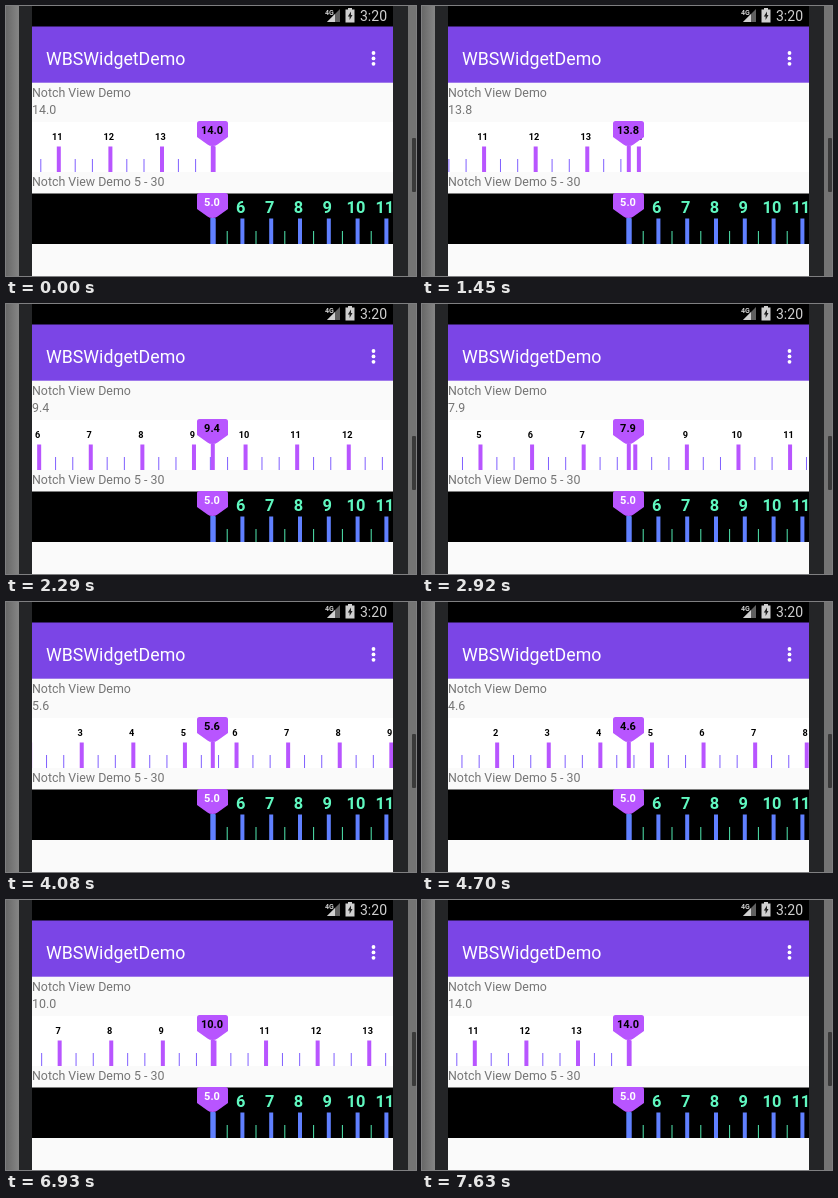
Recreate the animation shown at these times as an HTML page. Size 410 by 270 pixels, loop 8 s.

```html
<!DOCTYPE html>
<html lang="en">
<head>
<meta charset="utf-8">
<title>Notch View Demo</title>
<style>
  html, body { margin: 0; width: 100%; height: 100%; overflow: hidden; background: #707070; }
  svg { display: block; }
  text { font-family: Roboto, sans-serif; }
  .caption { font-size: 12.4px; fill: #757575; }
  .title { font-size: 17.75px; fill: #fff; }
  .clock { font-size: 14px; fill: #d0d0d0; }
  .label, .badge { font-weight: 700; text-anchor: middle; }
  .badge { font-size: 11px; }
</style>
</head>
<body>
<svg width="410" height="270" viewBox="0 0 410 270">
  <defs>
    <path id="pin" d="M-13 0H13Q15.5 0 15.5 2.5V16L5 23.5Q3 25 0 25Q-3 25 -5 23.5L-15.5 16V2.5Q-15.5 0 -13 0Z" fill="#b855ff"/>
    <linearGradient id="rim">
      <stop stop-color="#686868"/>
      <stop offset="1" stop-color="#868686"/>
    </linearGradient>
  </defs>

  <!-- Device -->
  <rect width="13" height="270" fill="url(#rim)"/>
  <rect x="402" width="8" height="270" fill="#747474"/>
  <rect x="13" width="389" height="270" fill="#242527"/>
  <rect x="406" y="132" width="4" height="54" rx="1" fill="#3a3a3a"/>
  <rect x="26" width="361" height="270" fill="#fafafa"/>

  <!-- Status bar -->
  <rect x="26" width="361" height="21" fill="#000"/>
  <text x="319" y="8.5" font-size="7" font-weight="700" fill="#d0d0d0">4G</text>
  <path d="M334 3V16H321Z" fill="#606060"/>
  <path d="M329 8V16H321Z" fill="#d0d0d0"/>
  <path d="M342 3.5V2H346V3.5H348.5V16.5H339.5V3.5Z" fill="#d0d0d0"/>
  <path d="M345 5.5L341.8 10.5H343.6V14L346.5 9H345Z" fill="#222"/>
  <text class="clock" x="354" y="15">3:20</text>

  <!-- Toolbar -->
  <rect x="26" y="20.5" width="361" height="56.2" fill="#7b45e6"/>
  <text class="title" x="40" y="59">WBSWidgetDemo</text>
  <g fill="#fff">
    <circle cx="367.5" cy="47" r="1.9"/>
    <circle cx="367.5" cy="52.4" r="1.9"/>
    <circle cx="367.5" cy="57.8" r="1.9"/>
  </g>

  <text class="caption" x="26" y="90.5">Notch View Demo</text>
  <text class="caption" x="26" y="107.5" data-value>14.0</text>
  <text class="caption" x="26" y="179.5">Notch View Demo 5 - 30</text>

  <!-- Rulers: x = 0 is the pointer -->
  <svg x="26" y="116" width="361" height="50" viewBox="-180.8 0 361 50">
    <rect x="-181" width="362" height="50" fill="#fff"/>
    <g id="light"></g>
    <rect x="-2" y="24" width="4" height="26" fill="#b855ff"/>
  </svg>
  <use href="#pin" x="206.5" y="115"/>
  <text class="badge" x="206" y="128" data-value>14.0</text>

  <rect x="26" y="187.5" width="361" height="50.5" fill="#000"/>
  <svg x="26" y="188" width="361" height="50" viewBox="-180.8 0 361 50">
    <g id="dark"></g>
    <rect x="-2.5" y="24" width="5" height="26" fill="#6080ff"/>
  </svg>
  <use href="#pin" x="206.5" y="187"/>
  <text class="badge" x="206" y="199.5" fill="#fff">5.0</text>
</svg>

<script>
const LOOP = 8000;
const STEP = 76.4; // the display refreshes this often while dragging, in ms
const UNIT = 51.6;
const START_VALUE = 14;

// skew below 1 makes a drag quick at first and slow at the end.
const drags = [
  { start: 1373, steps: 20, to: 7.89, skew: 0.76 },
  { start: 3622, steps: 11, to: 3.78, skew: 1 },
  { start: 4462, steps: 13, to: 9.6, skew: 1 },
  { start: 6773, steps: 11, to: 14, skew: 1 }
];

const smooth = u => u * u * (3 - 2 * u);

function valueAt(time) {
  let value = START_VALUE;
  for (const { start, steps, to, skew } of drags) {
    if (time < start) break;
    const progress = Math.min(Math.floor((time - start) / STEP) / steps, 1);
    value += (to - value) * smooth(progress ** skew);
  }
  return value;
}

function add(parent, name, attributes, content = "") {
  const node = document.createElementNS("http://www.w3.org/2000/svg", name);
  for (const key in attributes) node.setAttribute(key, attributes[key]);
  node.textContent = content;
  parent.append(node);
}

function buildRuler(group, { from, to, unit, parts, major, minor, ink, size, baseline }) {
  for (let i = 0; i <= (to - from) * parts; i++) {
    const x = i * unit / parts;
    if (i % parts) {
      add(group, "rect", { x: x - 0.5, y: 37, width: 1, height: 13, fill: minor });
      continue;
    }
    add(group, "rect", { x: x - 1.2, y: 24.5, width: 4, height: 25.5, fill: major });
    add(group, "text", { class: "label", x: x - 0.8, y: baseline, "font-size": size, fill: ink },
      from + i / parts);
  }
}

const light = document.getElementById("light");
buildRuler(light, {
  from: 0, to: 14, unit: UNIT, parts: 3,
  major: "#b855ff", minor: "#8060ff", ink: "#000", size: 9.2, baseline: 18.3
});
buildRuler(document.getElementById("dark"), {
  from: 5, to: 30, unit: 28.8, parts: 2,
  major: "#6080ff", minor: "#50e8b0", ink: "#60f8c0", size: 16.4, baseline: 18.6
});

const readouts = document.querySelectorAll("[data-value]");

function draw() {
  const value = valueAt(performance.now() % LOOP);
  light.setAttribute("transform", `translate(${-value * UNIT})`);
  for (const readout of readouts) readout.textContent = value.toFixed(1);
  requestAnimationFrame(draw);
}
draw();
</script>
</body>
</html>
```
